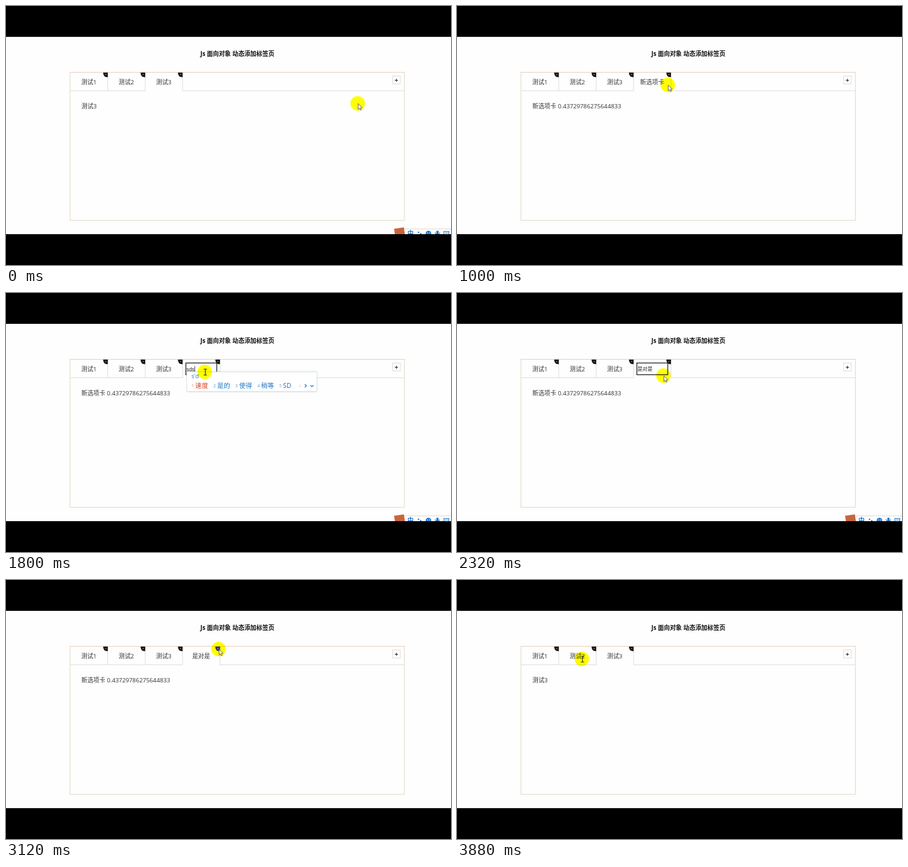
An HTML page with a canvas that plays this animation: 720 px wide and 420 px high, repeating every 3.92 s.

```html
<!DOCTYPE html>
<html lang="zh-CN">
<head>
<meta charset="utf-8">
<style>
html, body { margin: 0; width: 100%; height: 100%; overflow: hidden; background: #000; }
canvas { display: block; }
</style>
</head>
<body>
<canvas id="stage" width="720" height="420"></canvas>
<script>
const ctx = document.getElementById('stage').getContext('2d');
const LOOP = 3920, STEP = 40, TAB = 60.5;
const SANS = '"Open Sans", "Noto Sans CJK SC", sans-serif';
const ARIAL = '"Liberation Sans", "Noto Sans CJK SC", sans-serif';
const BLUE = '#1f76c4', LINE = '#e0dedb';

// Pointer stops: time, x, y
const PATH = [
  [0, 569, 158], [520, 631, 121], [640, 631, 121], [1000, 341, 128],
  [1120, 321, 127], [1240, 321, 127], [1320, 321.5, 128], [2280, 321.5, 128],
  [2320, 334, 134], [2640, 366, 152], [2840, 366, 152], [3120, 344, 112],
  [3560, 344, 112], [3880, 202, 128], [LOOP, 202, 128]
];

function pointerAt(t) {
  const i = PATH.findIndex(p => p[0] > t);
  const [t0, x0, y0] = PATH[i - 1], [t1, x1, y1] = PATH[i];
  const u = (t - t0) / (t1 - t0), e = u * u * (3 - 2 * u);
  return [x0 + (x1 - x0) * e, y0 + (y1 - y0) * e];
}

function rect(x, y, w, h, color) {
  ctx.fillStyle = color;
  ctx.fillRect(x, y, w, h);
}

function frame(x, y, w, h, color, width = 1) {
  ctx.strokeStyle = color;
  ctx.lineWidth = width;
  ctx.strokeRect(x, y, w, h);
}

function stroke(points, color, width = 1) {
  ctx.beginPath();
  points.forEach(p => ctx.lineTo(...p));
  ctx.strokeStyle = color;
  ctx.lineWidth = width;
  ctx.stroke();
}

function disc(x, y, r, color) {
  ctx.beginPath();
  ctx.arc(x, y, r, 0, 7);
  ctx.fillStyle = color;
  ctx.fill();
}

// Draws text vertically centred on y and returns its right edge
function text(str, x, y, { size = 9.7, color = '#333', font = SANS, weight = 400, align = 'left' } = {}) {
  ctx.font = `${weight} ${size}px ${font}`;
  ctx.textAlign = align;
  ctx.fillStyle = color;
  ctx.fillText(str, x, y + size * 0.37);
  return x + ctx.measureText(str).width;
}

function closeIcon(x, color = '#111') {
  ctx.beginPath();
  ctx.moveTo(x - 7.5, 108);
  ctx.lineTo(x, 108);
  ctx.lineTo(x, 115.5);
  ctx.quadraticCurveTo(x - 7.5, 115.5, x - 7.5, 108);
  ctx.fillStyle = color;
  ctx.fill();
  for (const d of [-1, 1])
    stroke([[x - 4.3, 111.2 - d], [x - 2.3, 111.2 + d]], '#bbb', 0.6);
}

function drawTabs(labels) {
  const last = labels.length - 1;
  stroke([[104, 137.5], [104 + TAB * last, 137.5]], LINE);
  stroke([[104 + TAB * (last + 1), 137.5], [644, 137.5]], LINE);
  labels.forEach((label, i) => {
    const right = 104 + TAB * (i + 1);
    stroke([[right + 0.2, 108], [right + 0.2, 138]], LINE);
    text(label, right - 30.3, 123, { align: 'center' });
    closeIcon(right + 0.2);
  });
}

function drawInput(t) {
  rect(291, 113.5, 50, 19, '#fff');
  frame(291, 113.5, 50, 19, '#222', 1.3);
  const typed = 'sds'.slice(0, Math.floor((t - 1720) / STEP) + 1);
  if (t < 1720) {
    rect(292.5, 118.5, 33, 10, '#1e78d7');
    text('新选项卡', 292.5, 123.5, { size: 8.1, color: '#fff', font: ARIAL });
  } else if (t < 2080) {
    const end = text(typed, 292, 123.5, { size: 8.3, color: '#222', font: ARIAL });
    stroke([[end + 0.5, 118.5], [end + 0.5, 128.5]], '#222', 0.8);
  } else {
    text('是对是', 292, 123.5, { size: 8.1, color: '#222', font: ARIAL });
  }
}

function drawCandidates(t) {
  const full = t >= 1840;
  const words = full ? ['是对是', '速度', '是的', '使得'] : ['速度', '是的', '使得', '稍等', 'SD'];
  ctx.save();
  ctx.shadowColor = 'rgba(0,60,90,.25)';
  ctx.shadowBlur = 3;
  rect(292.5, 128, 210.5, 31.5, '#fff');
  ctx.restore();
  frame(292.5, 128, 210.5, 31.5, '#d3e3ea', 0.8);
  text(full ? "s'd's" : "s'd", 300, 134, { size: 9.7, color: BLUE });
  let x = 300;
  words.forEach((word, i) => {
    const color = i ? BLUE : '#d8431f';
    text(i + 1, x, 150, { size: 7, color: i ? '#5c9bd0' : '#e0805f' });
    x = text(word, x + 6.3, 150, { size: 10.4, color }) + 8.4;
  });
  stroke([[476.5, 148.5], [474.5, 150.5], [476.5, 152.5]], '#bbb', 0.8);
  stroke([[483.5, 148], [486, 150.5], [483.5, 153]], BLUE, 1.2);
  stroke([[492.5, 149.5], [495, 152], [497.5, 149.5]], BLUE, 1.2);
}

function drawLanguageBar() {
  rect(640, 361, 80, 9, '#fff');
  stroke([[640, 361.5], [720, 361.5]], '#e3d8cf');
  ctx.save();
  ctx.translate(637, 368);
  ctx.rotate(-0.15);
  rect(-8, -8, 16, 16, '#c9653e');
  ctx.restore();
  text('中', 654.5, 368.5, { size: 10, weight: 700, color: BLUE, align: 'center' });
  disc(667.5, 367, 1.2, BLUE);
  disc(671, 369.5, 1.3, BLUE);
  disc(683.5, 369, 4.5, BLUE);
  disc(682, 368, 0.8, '#fff');
  disc(685.2, 368, 0.8, '#fff');
  rect(696.3, 364.5, 3.5, 6, BLUE);
  stroke([[694.3, 367], [695, 369.5], [701, 369.5], [701.8, 367]], BLUE);
  frame(708.5, 365.5, 8, 7, BLUE);
  stroke([[710, 368], [715.5, 368]], BLUE);
}

function drawPointer(t) {
  const [x, y] = pointerAt(t);
  ctx.globalCompositeOperation = 'multiply';
  disc(x, y, 11.7, '#ff0');
  ctx.globalCompositeOperation = 'source-over';
  if (t >= 3080 && t < 3520) closeIcon(346.2, '#30307c');
  if ((t >= 1080 && t < 2320) || t >= 3800) {
    const bar = [[x + 1, y - 4.5], [x + 1, y + 5]];
    stroke(bar, '#333', 1.2);
    for (const [, by] of bar) stroke([[x - 1.7, by], [x + 3.7, by]], '#333', 1.1);
    return;
  }
  ctx.beginPath();
  for (const [dx, dy] of [[0, 0], [0, 9.2], [2.1, 7.4], [3.6, 10.6], [5, 10], [3.6, 6.8], [6.4, 6.6]])
    ctx.lineTo(x + 0.8 + dx, y + 0.3 + dy);
  ctx.closePath();
  ctx.fillStyle = '#fff';
  ctx.fill();
  ctx.strokeStyle = '#444';
  ctx.lineWidth = 0.8;
  ctx.stroke();
}

function draw(t) {
  const added = t >= 600 && t < 3520;
  const editing = t >= 1360 && t < 2600;
  const labels = ['测试1', '测试2', '测试3'];
  if (added) labels.push(editing ? '' : t < 1360 ? '新选项卡' : '是对是');

  rect(0, 50, 720, 320, '#fefefe');
  text('Js 面向对象 动态添加标签页', 374.3, 77, { weight: 700, color: '#111', align: 'center' });
  frame(103.5, 107.5, 541, 240, '#e2dac8');
  stroke([[103, 107.5], [645, 107.5]], '#e8cfbd');
  drawTabs(labels);
  frame(625.5, 113.5, 12.5, 13, '#ddd');
  stroke([[629.2, 120.5], [634.2, 120.5]], '#222');
  stroke([[631.7, 118], [631.7, 123]], '#222');
  text(added ? '新选项卡 0.43729786275644833' : '测试3', 122, 162.5);

  if (editing) drawInput(t);
  if (t >= 1760 && t < 2080) drawCandidates(t);
  if (t < 520 || (t >= 1440 && t < 2600)) drawLanguageBar();
  drawPointer(t);
  rect(0, 0, 720, 50, '#000');
  rect(0, 370, 720, 50, '#000');
}

function tick() {
  draw(Math.floor(performance.now() % LOOP / STEP) * STEP);
  requestAnimationFrame(tick);
}
tick();
</script>
</body>
</html>
```
